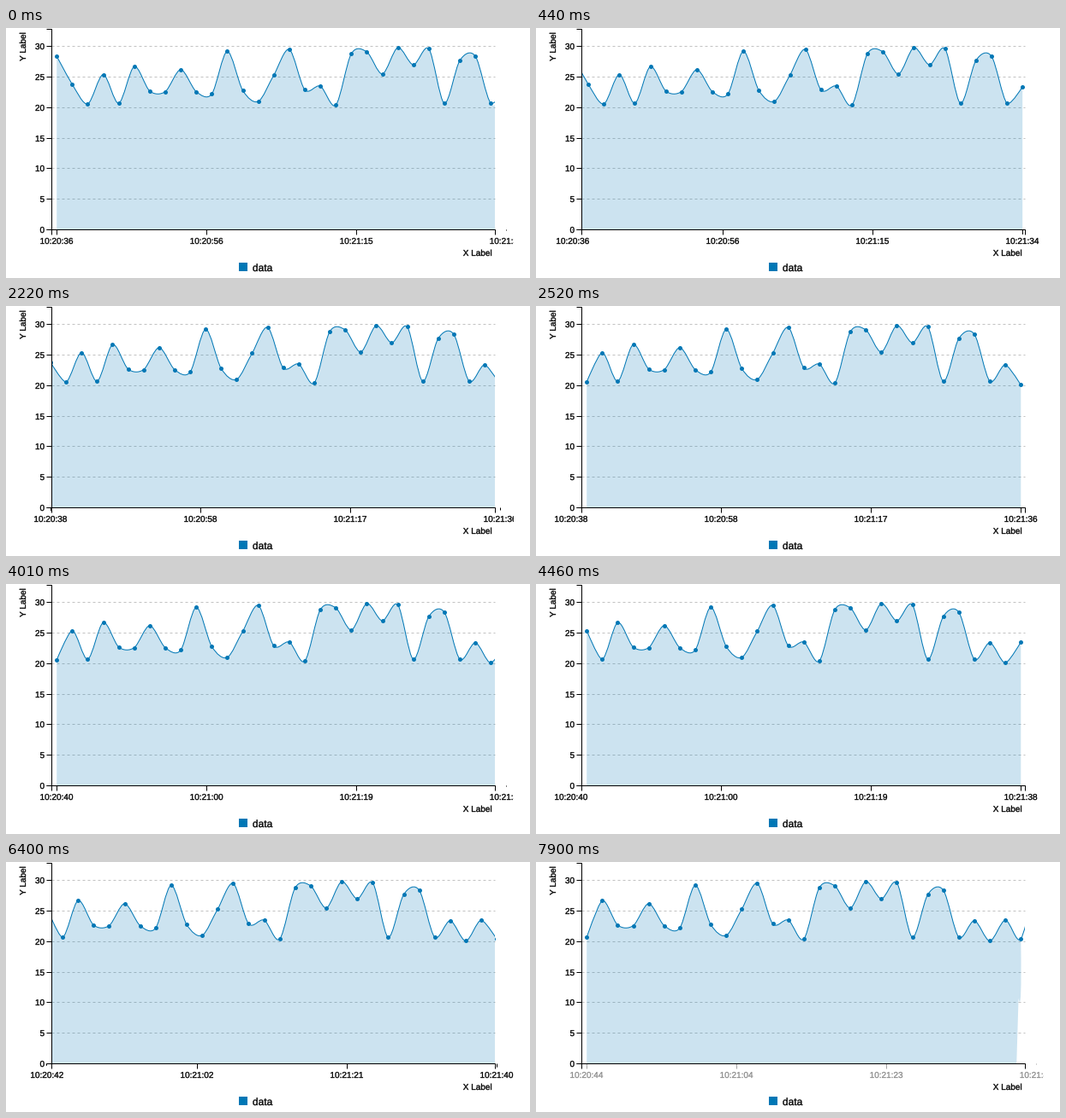
A matplotlib script that plays this animation: 612 by 293 pixels, repeating every 8 s.

```python
import numpy as np
import matplotlib.pyplot as plt
from matplotlib.animation import FuncAnimation
from matplotlib.patches import PathPatch, Rectangle
from matplotlib.path import Path
from matplotlib.textpath import TextPath
from matplotlib.transforms import Affine2D

W, H, DPI = 612, 293, 100
PX = 72 / DPI                      # one pixel in points
LOOP, INTERVAL = 8000, 20
BLUE = "#0077b5"

LEFT, RIGHT, TOP, BASE = 53.5, 571.5, 1.5, 236.5
X0, STEP, UNIT = 59.2, 18.11, 7.165
SHOWN = 29                         # points in the window at rest
FADE, FLOW_AT, FLOW = 350, 357, 400

DATA = np.array([
    28.4, 23.8, 20.6, 25.4, 20.7, 26.7, 22.7, 22.6, 26.2, 22.6, 22.2, 29.2,
    22.8, 21.0, 25.3, 29.5, 22.9, 23.5, 20.4, 28.8, 29.1, 25.5, 29.8, 27.0,
    29.6, 20.7, 27.7, 28.4, 20.7, 23.4, 20.1, 23.5, 20.4, 29.7])

STARTS = [-275, 1715, 3690, 5795, 7743]        # when each new value arrives
HOLDS = [0, 150, 300, 440, 590,                # when the picture refreshes
         1790, 1930, 2080, 2230, 2380, 2520,
         3720, 3870, 4010, 4160, 4310, 4460,
         5800, 5950, 6100, 6250, 6400, 6550, 6700,
         7750, 7900]
TICKS = [(0, 0), (9.67, 20), (19.33, 39), (29, 58)]   # (slot, seconds)

plt.rcParams["font.family"] = "Liberation Sans"
fig = plt.figure(figsize=(W / DPI, H / DPI), dpi=DPI, facecolor="white")
ax = fig.add_axes([0, 0, 1, 1])
ax.set_xlim(0, W)
ax.set_ylim(H, 0)
ax.axis("off")


def clip(artist, x, y, w, h):
    artist.set_clip_path(Rectangle((x, y), w, h, transform=ax.transData))
    return artist


def in_plot(artist):
    return clip(artist, LEFT - 0.5, 0, RIGHT - LEFT, BASE + 0.5)


def stroke(xs, ys, color="black", **kw):
    return ax.plot(xs, ys, color=color, lw=PX, solid_capstyle="butt",
                   dash_capstyle="butt", solid_joinstyle="miter",
                   snap=False, **kw)[0]


def shape(path, **kw):
    return ax.add_patch(PathPatch(path, snap=False, **kw))


def glyphs(x, y, s, size=10, align=0.0, turn=0):
    """Text outline; align 0, 0.5, 1 puts its left, middle, right at x."""
    path = TextPath((0, 0), s, size=size)
    ink = path.vertices[path.codes != Path.CLOSEPOLY, 0]
    anchor = ink.min() + align * (ink.max() - ink.min())
    place = Affine2D().translate(-anchor, 0).scale(1, -1)
    return path.transformed(place.rotate_deg(-turn).translate(x, y))


def label(*args, **kw):
    return shape(glyphs(*args, **kw), fc="black", ec="black", lw=0.35 * PX)


def ease(t):
    t = min(max(t, 0), 1)
    return 4 * t ** 3 if t < 0.5 else 1 - 4 * (1 - t) ** 3


def clock(sec):
    return f"10:{20 + sec // 60}:{sec % 60:02d}"


def spline(p):
    """Cardinal spline with quadratic end segments."""
    t = 0.15 * (p[2:] - p[:-2])
    verts = [p[0], p[1] - t[0] * 2 / 3, p[1]]
    for i in range(1, len(p) - 2):
        verts += [p[i] + t[i - 1], p[i + 1] - t[i], p[i + 1]]
    verts += [p[-2] + t[-1] * 2 / 3, p[-1]]
    codes = [Path.MOVETO] + [Path.CURVE3] * 2
    codes += [Path.CURVE4] * (3 * (len(p) - 3)) + [Path.CURVE3] * 2
    return np.array(verts), codes


# fixed parts
for v in range(0, 31, 5):
    y = np.floor(BASE - UNIT * v) + 0.5
    if v:
        stroke([LEFT, RIGHT], [y, y], "#c2c2c2", dashes=(3, 3), zorder=1)
    stroke([LEFT - 6, LEFT], [y, y], zorder=5)
    label(44.7, y + 3.5, str(v), align=1)
stroke([LEFT - 6, LEFT, LEFT, LEFT - 6], [TOP, TOP, BASE, BASE], zorder=5)
stroke([LEFT, LEFT, RIGHT, RIGHT], [BASE + 6, BASE, BASE, BASE + 6], zorder=5)
label(567, 267, "X Label", align=1)
label(23, 38.7, "Y Label", turn=90)
label(288.4, 285, "data", size=12)
ax.add_patch(Rectangle((272, 275), 10, 10, fc=BLUE, lw=0))

# moving parts
empty = Path([(0, 0), (0, 0)])
area = in_plot(shape(empty, fc=BLUE, alpha=0.2, lw=0, zorder=2))
curve = in_plot(shape(empty, fc="none", ec=BLUE, lw=PX, zorder=3))
dots = in_plot(ax.plot([], [], "o", color=BLUE, ms=5 * PX, mew=0,
                       snap=False, zorder=4)[0])
marks = [stroke([], [], zorder=5) for _ in TICKS]
times = [clip(label(0, 0, clock(0)), 20, 237, 573, 30) for _ in TICKS]


def draw_data(first, count, shift, grow):
    x = X0 + STEP * np.arange(count) - shift
    y = BASE - UNIT * DATA[first:first + count]
    verts, codes = spline(np.column_stack([x, y]))
    curve.set_path(Path(verts, codes))
    dots.set_data(x, y)

    # the newest stretch of the area unfolds from the old outline
    edge, corner = verts.copy(), x[-1]
    if grow < 1:
        old = np.array([[x[-2], BASE], [x[-3] + 0.2 * STEP, BASE]])
        edge[-2:] = old + grow * (verts[-2:] - old)
        corner = x[-3] + grow * (x[-1] - x[-3])
    outline = np.vstack([edge, [[corner, BASE], [x[0], BASE]]])
    area.set_path(Path(outline, codes + [Path.LINETO] * 2))


def draw_axis(k, flow, alpha):
    lengths = [6 * (1 - flow), 6, 6, 1 + 5 * flow]
    for (slot, sec), n, mark, text in zip(TICKS, lengths, marks, times):
        x = X0 + STEP * (slot - flow)
        xt = np.floor(x) + 0.5
        mark.set_data([xt, xt], [BASE, BASE + n])
        mark.set_alpha(alpha)
        text.set_path(glyphs(x, 253, clock(36 + 2 * k + sec), align=0.5))
        text.set_alpha(alpha)


def update(frame):
    now = frame * INTERVAL + INTERVAL / 2
    t = max(h for h in HOLDS if h <= now)
    k = max(i for i, s in enumerate(STARTS) if s <= t)
    dt = t - STARTS[k]
    grow = ease(dt / FADE)
    flow = min(max((dt - FLOW_AT) / FLOW, 0), 1)
    if flow < 1:
        draw_data(k, SHOWN + 1, STEP * flow, grow)
    else:
        draw_data(k + 1, SHOWN, 0, 1)
    draw_axis(k, flow, grow)
    return [area, curve, dots, *marks, *times]


anim = FuncAnimation(fig, update, frames=LOOP // INTERVAL, interval=INTERVAL,
                     init_func=lambda: update(0), repeat=True, repeat_delay=0,
                     blit=False)
plt.show()
```
